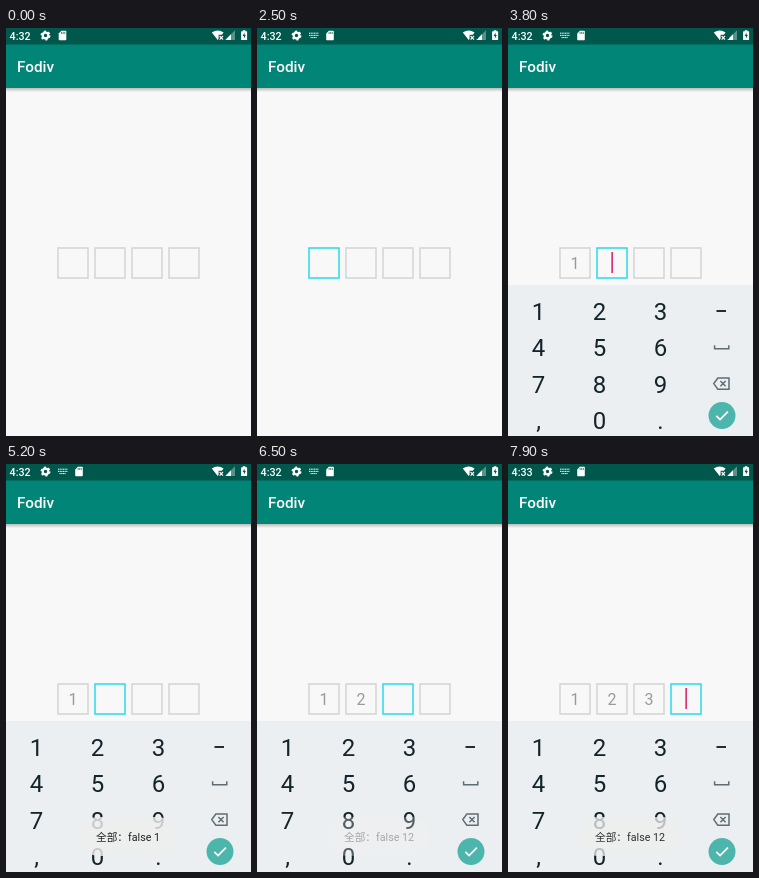
Animation of 245x408 px, one loop 8 s. Source, as an HTML page:

```html
<!DOCTYPE html>
<html lang="zh-CN">
<head>
<meta charset="utf-8">
<title>Code input</title>
<style>
  html, body { margin: 0; width: 100%; height: 100%; overflow: hidden; background: #f8f8f8; }
  svg { display: block; width: 245px; height: 408px; }
  text { font-family: Roboto, "Noto Sans CJK SC", "Noto Sans CJK", sans-serif; }
  .mid { text-anchor: middle; }
  .key { font-size: 24px; fill: #14242b; }
  .digit { font-size: 16px; fill: #9a9a9a; }
  .box { fill: none; stroke: #d4d4d4; stroke-width: 1.5; }
  .box.on { stroke: #2bd9ec; }
</style>
</head>
<body>
<svg viewBox="0 0 245 408">
  <defs>
    <linearGradient id="shade" x2="0" y2="1">
      <stop offset="0" stop-color="#000" stop-opacity=".25"/>
      <stop offset="1" stop-color="#000" stop-opacity="0"/>
    </linearGradient>
  </defs>
  <rect width="245" height="408" fill="#f8f8f8"/>
  <rect y="60" width="245" height="4" fill="url(#shade)"/>
  <rect y="16" width="245" height="44" fill="#008577"/>
  <rect width="245" height="16.5" fill="#00574b"/>
  <text x="11" y="44" font-size="15.3" font-weight="500" fill="#fff">Fodiv</text>

  <g fill="#fff">
    <text id="clock" x="3.6" y="11.7" font-size="10.7" font-weight="500"></text>
    <g fill="none" stroke="#fff">
      <circle cx="39.5" cy="7.5" r="2.8" stroke-width="2.2"/>
      <circle cx="39.5" cy="7.5" r="4.3" stroke-width="1.4" stroke-dasharray="2.2 2.303"/>
    </g>
    <path id="ime" d="M52 5.2h9.5M52 7.4h9.5M53.5 9.6h6.5" fill="none" stroke="#fff" stroke-width="1" stroke-dasharray="1.2 .45"/>
    <g id="card">
      <path d="M55.4 2.8h4.1q.8 0 .8.8v7.8q0 .8-.8.8h-6q-.8 0-.8-.8V5.5z"/>
      <path d="M55.6 4v2M57.2 4v2M58.8 4v2" stroke="#00574b" stroke-width=".7"/>
    </g>
    <path d="M205.8 4.5Q211.7 .3 217.6 4.5L215.8 6.8H212.6V10.8L211.7 12z"/>
    <path d="M213.6 8l3.4 3.6M217 8l-3.4 3.6" stroke="#fff" stroke-width="1.1"/>
    <path d="M229 2.3v9.7h-9.7z" opacity=".35"/>
    <path d="M225 6.3v5.7h-5.7z"/>
    <path d="M236.8 2.2h2.6v1h1.2q.5 0 .5.5v7.8q0 .5-.5.5h-5q-.5 0-.5-.5V3.7q0-.5.5-.5h1.2z"/>
    <path d="M238.6 4.5l-2 3.4h1.3v2.6l2-3.5h-1.3z" fill="#00574b"/>
  </g>

  <g id="boxes"></g>
  <rect id="cursor" y="224" width="1.5" height="21" fill="#d81b60"/>

  <g id="board">
    <rect y="257" width="245" height="151" fill="#eceff1"/>
    <rect id="press" y="264" width="60" height="36" rx="2" fill="#d3d9dc"/>
    <g id="keys"></g>
    <path d="M208.5 283h9.5" stroke="#14242b" stroke-width="1.9"/>
    <g fill="none" stroke="#5f6d74" stroke-width="1.5">
      <path d="M206.6 317.2v3.6h14.2v-3.6"/>
      <path d="M209.8 350h11.2v11.2h-11.2l-4-5.6zM212.4 353l5.2 5.2M217.6 353l-5.2 5.2"/>
    </g>
    <circle cx="214" cy="387.5" r="13.5" fill="#4db6ac"/>
    <path d="M208.3 387.8l3.8 3.8 7.8-8" fill="none" stroke="#fff" stroke-width="1.7"/>
  </g>

  <g id="toast">
    <rect id="pill" y="353" height="39" rx="19.5" fill="#eee" fill-opacity=".82"/>
    <text id="note" class="mid" x="122" y="376.7" font-size="10.7" fill="#202020"></text>
  </g>
</svg>
<script>
const $ = id => document.getElementById(id);
const LOOP = 8000, PITCH = 37;

function add(parent, tag, attrs, text = '') {
  const el = document.createElementNS('http://www.w3.org/2000/svg', tag);
  for (const k in attrs) el.setAttribute(k, attrs[k]);
  el.textContent = text;
  parent.append(el);
  return el;
}

const boxes = [], digits = [];
for (let i = 0; i < 4; i++) {
  boxes.push(add($('boxes'), 'rect', { class: 'box', x: 52 + i * PITCH, y: 220, width: 30, height: 30 }));
  digits.push(add($('boxes'), 'text', { class: 'digit mid', x: 67 + i * PITCH, y: 241 }, i + 1));
}
['123', '456', '789', ',0.'].forEach((row, r) =>
  [...row].forEach((ch, c) =>
    add($('keys'), 'text', { class: 'key mid', x: 30.5 + c * 61, y: 291.5 + r * 36.5 }, ch)));

// Each track lists [start time, value]; values hold until the next step.
const tracks = {
  focus: [[0, -1], [1200, 0], [3800, 1], [6200, 2], [7800, 3]],
  press: [[0, -1], [3600, 0], [3800, -1], [5800, 1], [6000, -1], [7500, 2], [7700, -1]],
  toast: [[0, 0], [4200, .15], [4300, .45], [4400, .75], [4500, .95], [4700, 1],
    [5800, .6], [5900, .2], [6000, 0],
    [6400, .1], [6500, .35], [6600, .6], [6700, .8], [6800, .93], [6900, 1], [7900, .93]],
  card: [[0, 0], [2200, 7], [2400, 16.5]]
};
const blinks = [1200, 1900, 2200, 2500, 2800, 3200, 3800, 4200, 4700, 5200, 5800, 6400, 6800, 7300, 7800];

const at = (name, t) => tracks[name].filter(s => s[0] <= t).pop()[1];
const show = (el, on) => el.setAttribute('visibility', on ? 'visible' : 'hidden');

function draw(t) {
  const focus = at('focus', t), press = at('press', t), card = at('card', t);
  boxes.forEach((b, i) => b.classList.toggle('on', i === focus));
  digits.forEach((d, i) => show(d, i < focus));
  $('cursor').setAttribute('x', 66.4 + focus * PITCH);
  show($('cursor'), blinks.filter(b => b <= t).length % 2);

  $('board').style.display = t < 2600 ? 'none' : '';
  $('press').setAttribute('x', 1 + press * 61);
  show($('press'), press >= 0);

  $('clock').textContent = t < 6600 ? '4:32' : '4:33';
  $('card').setAttribute('transform', `translate(${card})`);
  show($('ime'), t >= 2400);

  const second = t >= 6200, half = second ? 52 : 49;
  $('note').textContent = '全部：false ' + (second ? '12' : '1');
  $('pill').setAttribute('x', 122 - half);
  $('pill').setAttribute('width', half * 2);
  $('toast').setAttribute('opacity', at('toast', t));
}

function tick() {
  draw(performance.now() % LOOP);
  requestAnimationFrame(tick);
}
tick();
</script>
</body>
</html>
```
